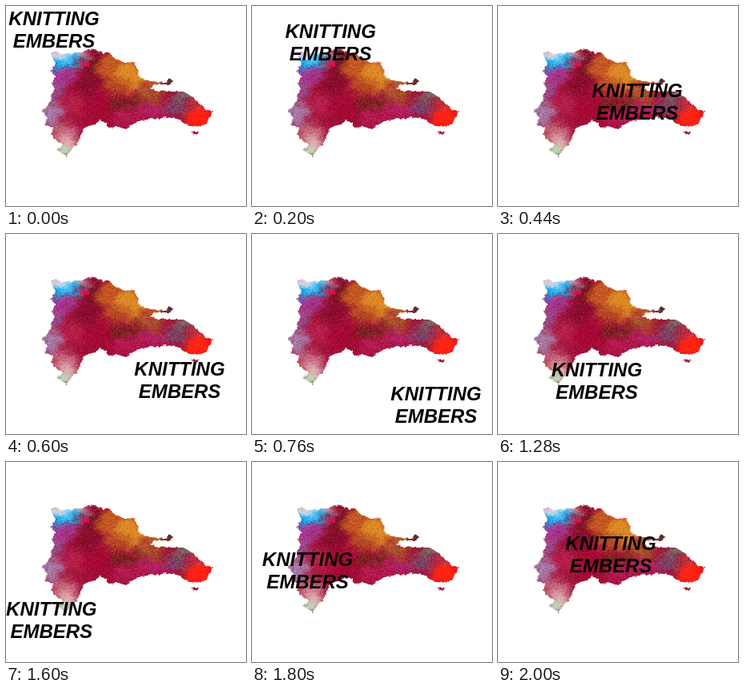
Write an HTML page that moves like this. It is 300x250 px and loops after 2040 ms.

```html
<!DOCTYPE html>
<html lang="en">
<head>
<meta charset="utf-8">
<title>Knitting Embers</title>
<style>
  html, body { margin: 0; width: 100%; height: 100%; overflow: hidden; background: #fff; }
  svg { display: block; width: 300px; height: 250px; }
  #caption { font: italic bold 24px "Liberation Sans", Arial, sans-serif; text-anchor: middle; }
</style>
</head>
<body>
<svg viewBox="0 0 300 250">
  <defs>
    <clipPath id="island">
      <path d="M57 58L63 57 69 60 84 59 97 57 103 54 111 55 122 59 128 57 136 66 148 70 160 71 165 80 166 88 173 92 182 94 200 96 203 90 209 94 204 98 185 98 180 103 190 106 204 107 222 107 234 114 243 123 250 129 258 131 256 137 250 147 243 151 231 150 224 147 215 141 200 139 190 141 180 140 172 143 162 145 156 150 150 154 140 151 128 152 124 146 117 143 112 148 103 150 96 154 94 162 89 172 81 180 76 188 70 184 63 181 71 173 60 166 57 160 59 152 48 148 52 140 45 131 54 123 57 113 61 103 57 97 62 88 56 82 61 72ZM231 157L242 158 238 161 233 159Z"/>
    </clipPath>
    <filter id="coast" x="0" y="0" width="300" height="250" filterUnits="userSpaceOnUse" color-interpolation-filters="sRGB">
      <feTurbulence type="fractalNoise" baseFrequency=".25" numOctaves="2" seed="4"/>
      <feDisplacementMap in="SourceGraphic" scale="4" xChannelSelector="R" yChannelSelector="G"/>
    </filter>
    <filter id="smear" x="0" y="0" width="300" height="250" filterUnits="userSpaceOnUse" color-interpolation-filters="sRGB">
      <feGaussianBlur in="SourceGraphic" stdDeviation="4" result="soft"/>
      <feTurbulence type="fractalNoise" baseFrequency=".05 .09" numOctaves="4" seed="9"/>
      <feDisplacementMap in="soft" scale="16" xChannelSelector="R" yChannelSelector="G"/>
    </filter>
    <filter id="grain" x="0" y="0" width="300" height="250" filterUnits="userSpaceOnUse" color-interpolation-filters="sRGB">
      <feTurbulence type="fractalNoise" baseFrequency=".5 .7" numOctaves="3" seed="2"/>
      <feColorMatrix values="2.4 0 0 0 -.7  1 1.4 0 0 -.7  1 0 1.4 0 -.7  0 0 0 0 1"/>
    </filter>
  </defs>
  <g filter="url(#coast)">
    <g clip-path="url(#island)">
      <g id="paint" filter="url(#smear)"><rect width="300" height="250" fill="#a20f36"/></g>
      <rect x="93" y="70" width="11" height="6" fill="#f5104c" opacity=".7"/>
      <rect width="300" height="250" filter="url(#grain)" opacity=".5" style="mix-blend-mode:soft-light"/>
    </g>
  </g>
  <g id="caption">
    <text x="60" y="24">KNITTING</text>
    <text x="60" y="52">EMBERS</text>
  </g>
</svg>
<script>
const LOOP = 2040, STEP = 40;
const caption = document.getElementById("caption");
const paint = document.getElementById("paint");

// Soft strokes: colour, centre x, y, radius x, y
const strokes = [
  ["#a83490", 70, 86, 17, 13], ["#9a4a90", 60, 106, 10, 10], ["#7c1024", 112, 72, 12, 17],
  ["#8c0c2c", 102, 98, 14, 14], ["#a878a4", 55, 134, 15, 16], ["#b41c48", 84, 124, 18, 14],
  ["#c86880", 74, 158, 18, 12], ["#e0b0b0", 76, 172, 14, 8], ["#a80832", 116, 128, 22, 18],
  ["#c65620", 134, 76, 20, 17], ["#dc8a22", 157, 88, 22, 18], ["#b84820", 138, 100, 16, 10],
  ["#702018", 150, 122, 20, 7], ["#b81852", 152, 138, 20, 9], ["#a85824", 180, 112, 18, 8],
  ["#b82068", 186, 130, 20, 8], ["#7c4468", 212, 127, 14, 9], ["#6c8068", 224, 112, 15, 6],
  ["#c04850", 242, 126, 12, 5], ["#ff2010", 241, 140, 20, 13], ["#d08a20", 188, 96, 10, 5],
  ["#364a2c", 206, 94, 8, 6], ["#2878c8", 64, 75, 14, 4], ["#18b4f0", 74, 68, 25, 7],
  ["#f4e8f0", 74, 57, 30, 6], ["#b0f4c4", 73, 185, 14, 6]
];
for (const [fill, cx, cy, rx, ry] of strokes) {
  const blob = document.createElementNS("http://www.w3.org/2000/svg", "ellipse");
  for (const [name, value] of Object.entries({ fill, cx, cy, rx, ry })) blob.setAttribute(name, value);
  paint.append(blob);
}

// Caption path: each leg is a cubic curve of offsets, run between two times
const legs = [
  { from: 0, to: 680, x: [0, 17, 144, 170], y: [0, -14, 98, 184] },
  { from: 760, to: 1560, x: [170, 140, 53, -3], y: [184, 175, 121, 184] },
  { from: 1560, to: 2000, x: [-3, -4, -5, 81], y: [184, 123, 81, 86] }
];

function bezier([a, b, c, d], u) {
  const v = 1 - u;
  return v * v * v * a + 3 * v * v * u * b + 3 * v * u * u * c + u * u * u * d;
}

function draw(now) {
  const t = Math.floor(now % LOOP / STEP) * STEP;
  const leg = legs.findLast(({ from }) => t >= from);
  const u = Math.min(1, (t - leg.from) / (leg.to - leg.from));
  caption.setAttribute("transform", `translate(${bezier(leg.x, u)} ${bezier(leg.y, u)})`);
}

const start = performance.now();
function tick() {
  draw(performance.now() - start);
  requestAnimationFrame(tick);
}
tick();
</script>
</body>
</html>
```
